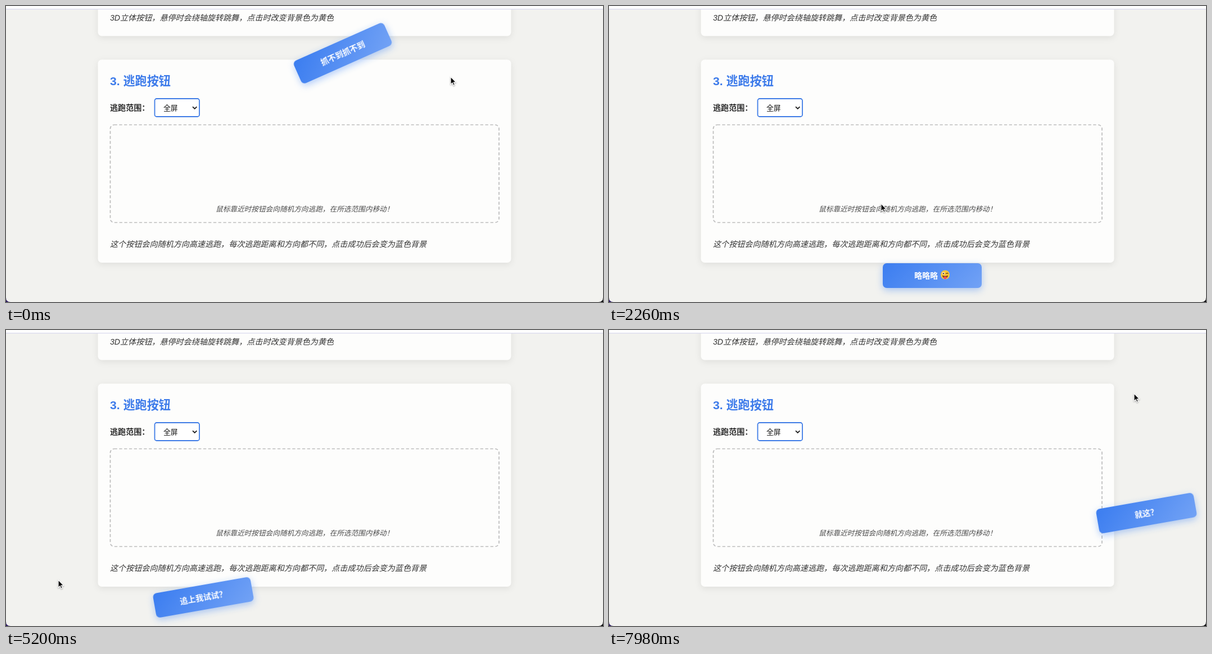
Recreate the animation shown at these times as an HTML page. Size 1062 by 527 pixels, loop 8000 ms.

```html
<!DOCTYPE html>
<html lang="zh-CN">
<head>
<meta charset="utf-8">
<title>逃跑按钮</title>
<style>
html, body { margin: 0; width: 100%; height: 100%; overflow: hidden; background: #f2f2ef; }
svg { display: block; width: 1062px; height: 527px; font: 14.08px "Liberation Sans", "Noto Sans CJK SC", "Noto Sans CJK", sans-serif; }
.card { fill: #fdfdfc; filter: drop-shadow(0 3px 6px rgba(0, 0, 0, .08)); }
.note { font-style: italic; fill: #333; }
.bold { font-weight: 700; }
#button { filter: drop-shadow(0 4px 6.5px rgba(66, 133, 244, .42)); }
#cursor { filter: drop-shadow(0 1px 1px rgba(0, 0, 0, .35)); }
</style>
</head>
<body>
<svg viewBox="0 0 1062 527">
  <defs>
    <linearGradient id="blue" gradientUnits="userSpaceOnUse" x1="-55" y1="-55" x2="55" y2="55">
      <stop stop-color="#3b7df0"/><stop offset="1" stop-color="#72a2f5"/>
    </linearGradient>
  </defs>
  <rect width="1062" height="527" fill="#f2f2ef"/>
  <rect class="card" x="163.5" y="-20" width="735" height="73.5" rx="7"/>
  <rect class="card" x="163.5" y="95.5" width="735" height="361.5" rx="7"/>
  <rect width="1062" height="5" fill="#fdfdfd"/>
  <rect y="5" width="1062" height="1.2" fill="#d9d9ee"/>

  <text class="note" x="185" y="25.7">3D立体按钮，悬停时会绕轴旋转跳舞，点击时改变背景色为黄色</text>
  <text class="bold" x="185" y="141" font-size="21.1" fill="#3d7bea">3. 逃跑按钮</text>
  <text class="bold" x="185" y="186.3" fill="#2b2b2b">逃跑范围：</text>

  <rect x="264.5" y="165" width="79.5" height="32" rx="3.5" fill="#fff" stroke="#3f7ce6" stroke-width="1.8"/>
  <text x="280" y="185.7" font-size="12.8" fill="#111">全屏</text>
  <path d="M332 179.3l3.7 3.7 3.7-3.7" fill="none" stroke="#222" stroke-width="1.9"/>

  <rect x="185.5" y="211.5" width="691.5" height="174" rx="7" fill="none" stroke="#bcbcbc" stroke-width="1.7" stroke-dasharray="5.3 3.5"/>
  <text class="note" x="373" y="365.6" font-size="12.67" style="fill: #4c4c4c">鼠标靠近时按钮会向随机方向逃跑，在所选范围内移动！</text>
  <text class="note" x="185" y="429">这个按钮会向随机方向高速逃跑，每次逃跑距离和方向都不同，点击成功后会变为蓝色背景</text>

  <g id="button">
    <rect x="-88" y="-22" width="176" height="44" rx="7" fill="url(#blue)"/>
    <text id="label" class="bold" y="5.3" fill="#fff" text-anchor="middle"></text>
    <g id="face" transform="translate(23 -1.5)">
      <circle r="8" fill="#fcc736"/>
      <path d="M-5 1Q0 3.5 5 1Q4.5 6 0 6T-5 1" fill="#6b3a12"/>
      <path d="M-2.7 3.3H2.7V6Q0 9.5-2.7 6Z" fill="#ef4a62"/>
      <g id="wink" fill="#5b3410">
        <circle cx="-3" cy="-2.5" r="2.2" fill="#fff"/><circle cx="-3" cy="-2.3" r="1.3"/>
        <path d="M1.2-1.5Q3.3-4 5.5-1.8" fill="none" stroke="#5b3410" stroke-width="1.2"/>
      </g>
      <path id="squint" d="M-5.5-4.5L-2-2.5-5.5-.8M5.5-4.5L2-2.5 5.5-.8" fill="none" stroke="#5b3410" stroke-width="1.2"/>
    </g>
  </g>

  <path d="M0 519Q0 527 8 527H0Z" fill="#2b1762"/>
  <path d="M1062 519Q1062 527 1054 527H1062Z" fill="#08080c"/>
  <path id="cursor" d="M0 0V13.6L3.1 10.8 5.1 15.4 7.4 14.4 5.4 9.9H9.6Z" fill="#000" stroke="#fff" stroke-width="1.2"/>
</svg>
<script>
const LOOP = 8000;
const CATCH = '抓不到抓不到', TEASE = '略略略', CHASE = '追上我试试？', THAT = '就这？';
const $ = id => document.getElementById(id);

// time, x, y, angle, label, expression
const flight = [
  [0, 599, 84, -24, CATCH],
  [20, 599, 84, -24, CATCH],
  [380, 597, 372, 0, CATCH],
  [1800, 597, 372, 0, TEASE, 'wink'],
  [1960, 590, 430, -38, TEASE, 'wink'],
  [2140, 575, 480, 0, TEASE, 'wink'],
  [2880, 575, 480, 0, TEASE, 'wink'],
  [3060, 466.5, 468.2, -38, TEASE, 'wink'],
  [3080, 466.5, 468.2, -38, TEASE, 'wink'],
  [3300, 330, 455, 0, TEASE, 'squint'],
  [3560, 330, 455, 0, TEASE, 'squint'],
  [3680, 272, 447, -38, TEASE, 'squint'],
  [3800, 237, 441, -7, TEASE, 'squint'],
  [3900, 237, 441, -7, TEASE, 'squint'],
  [3960, 230, 440, 0, TEASE, 'squint'],
  [4900, 230, 440, 0, CHASE],
  [5060, 300, 462, -38, CHASE],
  [5200, 351, 476, -10, CHASE],
  [5300, 351, 476, -10, CHASE],
  [5360, 360, 478, 0, CHASE],
  [6240, 360, 478, 0, CHASE],
  [6560, 758, 253, -37.7, CHASE],
  [6580, 758, 253, -37.7, CHASE],
  [6780, 900, 215, 0, CHASE],
  [7640, 900, 215, 0, THAT],
  [7840, 940, 292, -38, THAT],
  [7980, 956, 326, -10, THAT],
  [LOOP, 956, 326, -10, THAT]
];

// time, x, y
const pointer = [
  [0, 791, 126], [20, 791, 126], [1420, 273, 275], [1520, 273, 275],
  [3060, 720, 438], [3080, 720, 438], [3800, 353, 397], [3900, 353, 397],
  [5200, 93, 445], [5300, 93, 445], [6560, 587, 348], [6580, 587, 348],
  [7980, 934, 113], [LOOP, 934, 113]
];

const linear = u => u;
const smooth = u => u * u * (3 - 2 * u);

function sample(keys, t, ease) {
  const i = keys.findIndex(k => k[0] > t);
  const a = keys[i - 1], b = keys[i];
  const u = ease((t - a[0]) / (b[0] - a[0]));
  return a.map((v, j) => typeof v === 'number' ? v + (b[j] - v) * u : v);
}

function show(id, on) {
  $(id).style.display = on ? '' : 'none';
}

function draw(t) {
  const [, x, y, angle, text, mood] = sample(flight, t, linear);
  $('button').setAttribute('transform', `translate(${x} ${y}) rotate(${angle})`);
  $('label').textContent = text;
  $('label').setAttribute('x', mood ? -11 : 0);
  show('face', mood);
  show('wink', mood === 'wink');
  show('squint', mood === 'squint');

  const [, cx, cy] = sample(pointer, t, smooth);
  $('cursor').setAttribute('transform', `translate(${cx} ${cy})`);
}

const start = performance.now();
function tick() {
  draw((performance.now() - start) % LOOP);
  requestAnimationFrame(tick);
}
tick();
</script>
</body>
</html>
```
